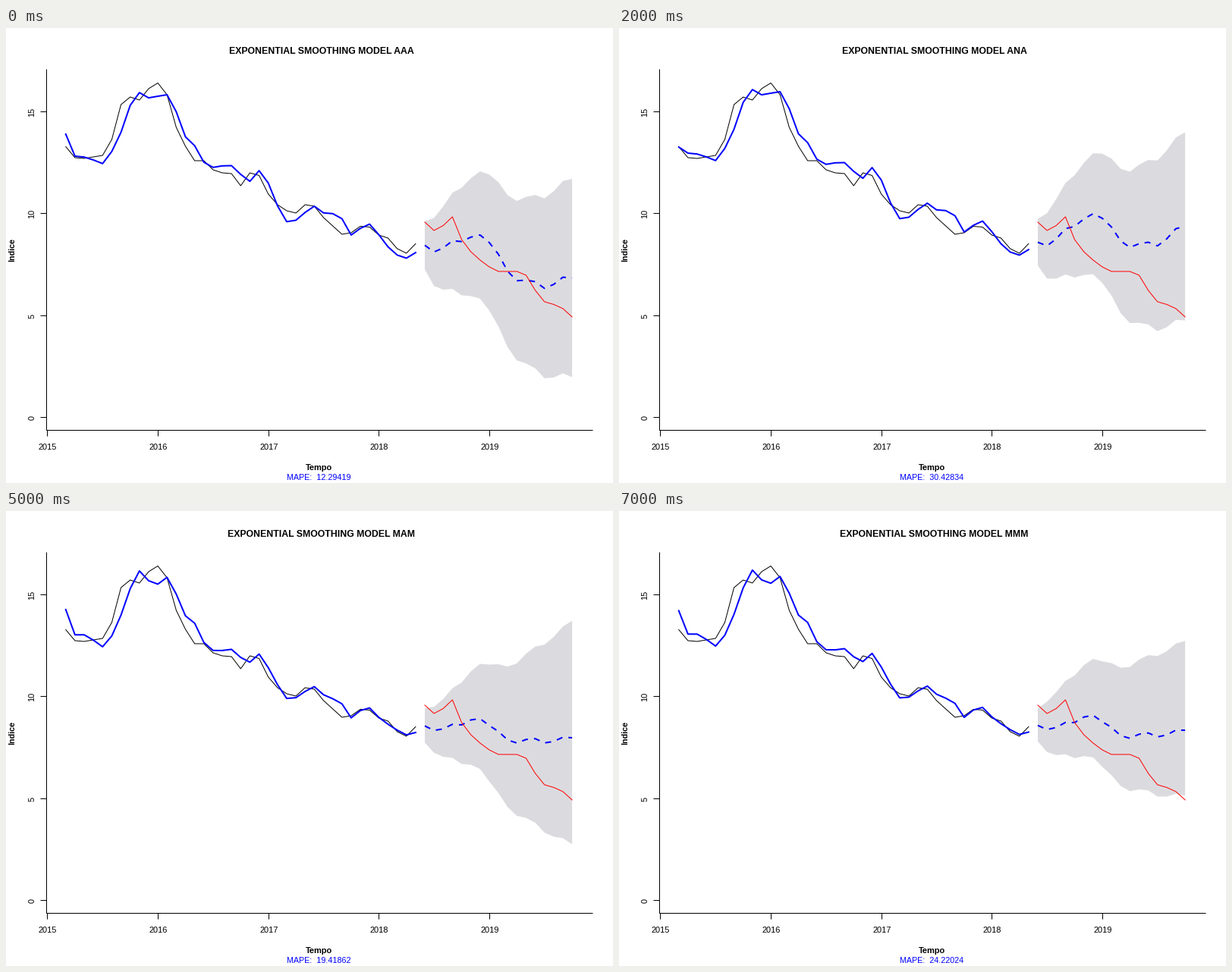
A matplotlib script for the animation above (8 s loop, 800 by 600 pixels).

```python
import numpy as np
import matplotlib.pyplot as plt
from matplotlib.animation import FuncAnimation
from matplotlib.patches import Rectangle

PX = 0.72  # points per pixel at 100 dpi
BLUE, RED, SHADE = "#0000ff", "#ff0000", "#dbdbdf"
LEFT, RIGHT, TOP, BOTTOM = 53.5, 773, 55, 530.5
ZERO = 513  # stage row of the value 0

plt.rcParams["font.family"] = ["Liberation Sans", "DejaVu Sans"]


def year_x(year):
    return 54.5 + 145.6 * (year - 2015)


# The index itself, as stage rows per month; every model is computed from it.
observed = np.array([
    156.5, 171, 172, 170, 168, 147, 101, 91, 95, 80, 72.5, 88, 131,
    156, 175, 175, 187, 191, 192, 208, 191, 194.5, 219, 233, 241, 244,
    233, 235, 250, 261, 272, 270, 261.5, 262.5, 273, 277, 291, 297, 284.5])
actual = np.array([256, 267, 260.5, 249, 279, 295, 306, 315, 321, 321, 321,
                   326, 346, 361, 364.5, 370, 381])

# Typical change into each month, January first.
ADDITIVE = [6, 11.5, 18.4, 8.5, -4.8, -2, 4.8, -9.2, -13.5, -3, -9.8, -6.9]
MIXED = [9.6, 8.4, 13.4, 3.9, -8.6, -3.3, 6.1, -4.6, -9.8, -0.8, -10.3, -4]

steps = np.arange(len(actual))
past_x = year_x(2015 + (2 + np.arange(len(observed))) / 12)
next_x = year_x(2018 + (5 + steps) / 12)


def damped(level, trend, phi=0.78, beta=0.77):
    """Damped trend smoothing whose level follows each observation."""
    fit = []
    for y in observed:
        fit.append(level + trend)
        trend = phi * (trend + beta * (y - fit[-1]))
        level = y
    ahead = level + trend * (1 - phi ** (steps + 1)) / (1 - phi)
    return fit, ahead


def seasonal(first, season, trend, scaled=False):
    """Last observation plus trend and seasonal change."""
    def step(y, month):
        gain = (ZERO - y) / 300 if scaled else 1
        return y + gain * (season[month % 12] + trend)

    fit = [first] + [step(y, 3 + t) for t, y in enumerate(observed[:-1])]
    ahead, y = [], observed[-1]
    for i in steps:
        y = step(y, 5 + i)
        ahead.append(y)
    return fit, np.array(ahead)


def root(start, rate):
    return start * np.sqrt(1 + rate * steps)


def spread(start, rate, bend=0):
    return start + rate * steps - bend * steps ** 2


def model(name, mape, series, up, down=None):
    fit, ahead = series
    down = up if down is None else down
    return name, mape, fit, ahead, ahead - up, ahead + down


models = [
    model("AAA", "12.29419", seasonal(140, ADDITIVE, 4), root(31.7, 1)),
    model("AAN", "35.44031", damped(147.6, 6.4), spread(28.5, 26.3, 0.27)),
    model("ANA", "30.42834", seasonal(157, ADDITIVE, 0), root(30.8, 0.95)),
    model("ANN", "25.14873", seasonal(observed[0], [0] * 12, 0),
          root(30.7, 1)),
    model("MAA", "15.60869", seasonal(128, MIXED, 2.8), spread(23.5, 10.55)),
    model("MAM", "19.41862", seasonal(130, MIXED, 1.8, True),
          spread(23, 8.2), spread(22, 7.4)),
    model("MAN", "34.95943", damped(141, 17.5), spread(20, 19.2, 0.15)),
    model("MMM", "24.22024", seasonal(131.5, MIXED, 1, True),
          root(22.5, 1.65), root(21, 1)),
]

fig = plt.figure(figsize=(8, 6), dpi=100, facecolor="white")
ax = fig.add_axes([0, 0, 1, 1])
ax.set_xlim(0, 800)
ax.set_ylim(600, 0)
ax.axis("off")


def line(x, y, color="black", width=1, **style):
    return ax.plot(x, y, color=color, lw=width * PX, snap=False,
                   solid_joinstyle="round", **style)[0]


def label(x, y, text, size=11, **style):
    return ax.text(x, y, text, fontsize=size * PX, ha="center", va="baseline",
                   rotation_mode="anchor", **style)


line([LEFT, LEFT, RIGHT], [TOP, BOTTOM, BOTTOM])
for value in (0, 5, 10, 15):
    y = round(ZERO - 26.86 * value) + 0.5
    line([46, LEFT], [y, y])
    label(37.5, y, str(value), rotation=90)
for year in range(2015, 2020):
    x = round(year_x(year)) + 0.5
    line([x, x], [BOTTOM, 538])
    label(x, 556, str(year))

title = label(415.5, 33.5, "", 12.25, weight="bold")
label(412, 583, "Tempo", weight="bold")
label(11.5, 293, "Indice", 10.8, weight="bold", rotation=90)
note = label(412.5, 596.5, "", 10.7, color=BLUE)

band, = ax.fill([0, 0, 0], [0, 0, 0], color=SHADE, lw=0, zorder=3)
band.set_clip_path(Rectangle((LEFT, TOP), RIGHT - LEFT, 531 - TOP,
                             transform=ax.transData))
line(past_x, observed, zorder=4)
fitted = line(past_x, observed, BLUE, 2, zorder=5)
forecast = line(next_x, actual, BLUE, 2, zorder=5, linestyle=(0, (4, 4)))
line(next_x, actual, RED, zorder=6)


def draw(i):
    name, mape, fit, ahead, upper, lower = models[i]
    title.set_text(f"EXPONENTIAL SMOOTHING MODEL {name}")
    note.set_text(f"MAPE:  {mape}")
    fitted.set_ydata(fit)
    forecast.set_ydata(ahead)
    band.set_xy(np.column_stack([np.append(next_x, next_x[::-1]),
                                 np.append(upper, lower[::-1])]))
    return title, note, fitted, forecast, band


anim = FuncAnimation(fig, draw, frames=len(models), interval=1000, repeat=True)
plt.show()
```
